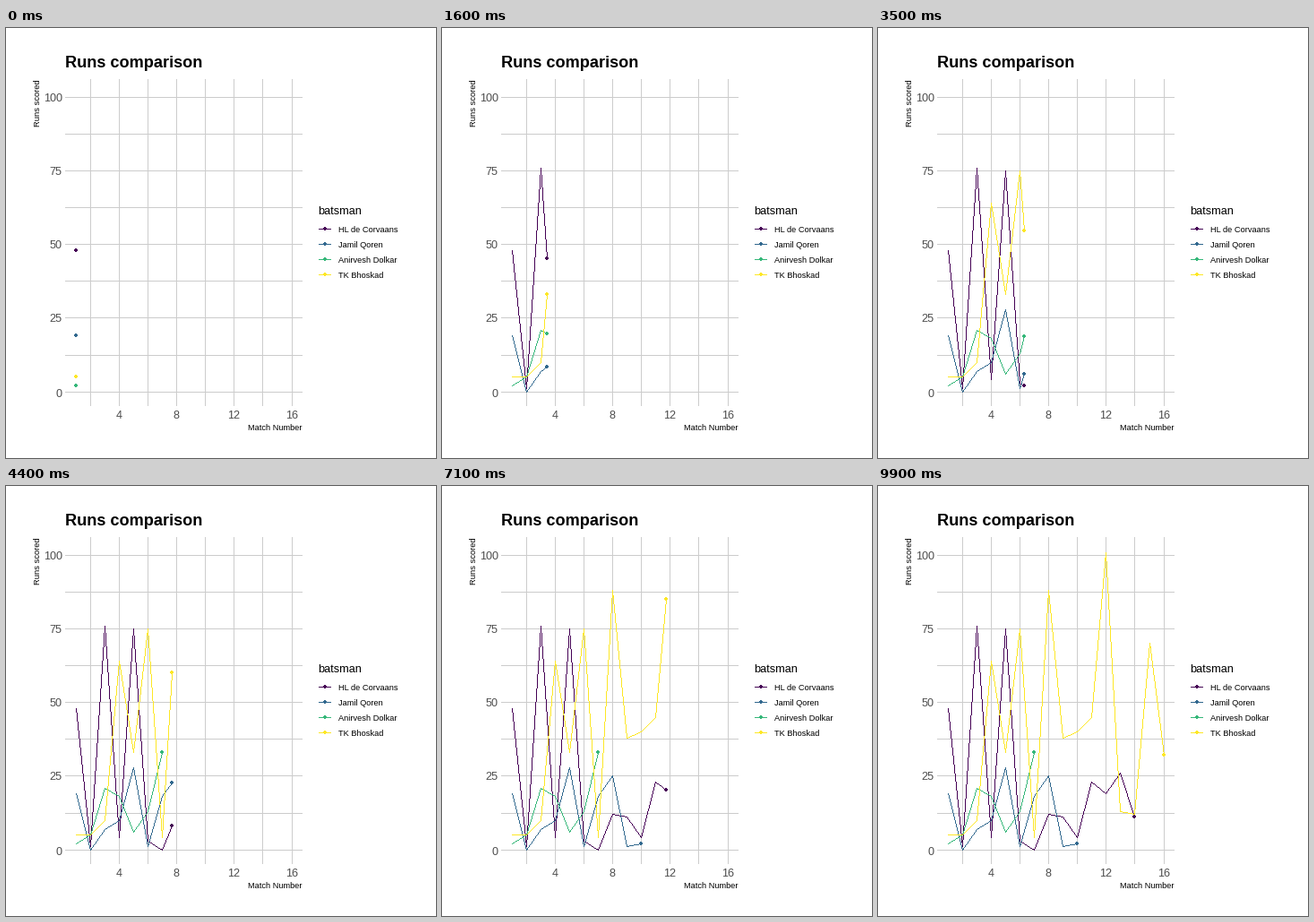
A matplotlib script for the animation above (10000 ms loop, 480 by 480 pixels).

```python
import matplotlib.pyplot as plt
import numpy as np
from matplotlib.animation import FuncAnimation
from matplotlib.colors import to_rgb

SIZE, DPI = 480, 80
FRAMES, INTERVAL = 100, 100
PX = 72 / DPI  # points per pixel

plt.rcParams["font.family"] = "Liberation Sans"

SERIES = [
    ("HL de Corvaans", "#440154",
     [48, 1, 76, 4, 75, 3, 0, 12, 11, 4, 23, 19, 26, 11]),
    ("Jamil Qoren", "#31688e", [19, 0, 7, 10, 28, 1, 18, 25, 1, 2]),
    ("Anirvesh Dolkar", "#35b779", [2, 5, 21, 18, 6, 13, 33]),
    ("TK Bhoskad", "#fde725",
     [5, 5, 10, 64, 33, 75, 4, 88, 38, 40, 45, 101, 13, 12, 70, 32]),
]
MATCHES = np.arange(1, 17)
# Each match falls on a whole frame; the reveal is linear in between.
KEYS = np.round((MATCHES - 1) * (FRAMES - 1) / 15)

LEFT, RIGHT, TOP, BOTTOM = 66, 331, 57, 422
GRID, TICK = "#cccccc", "#4d4d4d"


def px_x(match):
    return np.floor(78.2 + 16.06 * (np.asarray(match) - 1)).astype(int)


def px_y(runs):
    return np.floor(406.1 - 3.288 * np.asarray(runs)).astype(int)


# Lines and dots have hard pixel edges, so they are rasterised directly.
def stroke(img, xs, ys, color):
    for x0, y0, x1, y1 in zip(xs, ys, xs[1:], ys[1:]):
        n = max(abs(x1 - x0), abs(y1 - y0)) + 1
        cols = np.round(np.linspace(x0, x1, n)).astype(int)
        rows = np.round(np.linspace(y0, y1, n)).astype(int)
        img[rows, cols] = to_rgb(color)


def dot(img, x, y, color):
    img[y - 2:y + 2, x - 1:x + 1] = to_rgb(color)
    img[y - 1:y + 1, x - 2:x + 2] = to_rgb(color)


fig = plt.figure(figsize=(SIZE / DPI, SIZE / DPI), dpi=DPI, facecolor="white")
ax = fig.add_axes([0, 0, 1, 1])
ax.axis("off")
base = np.ones((SIZE, SIZE, 3))


def label(x, y, text, size, color="black", **kw):
    ax.text(x, y, text, fontsize=size * PX, color=color, va="baseline", **kw)


def draw_panel():
    for m in range(2, 17, 2):
        x = px_x(m)
        stroke(base, [x, x], [TOP, BOTTOM - 1], GRID)
        if m % 4 == 0:
            label(x - 0.3, 436.5, str(m), 12.6, TICK, ha="center")
    for runs in np.arange(0, 101, 12.5):
        y = px_y(runs)
        stroke(base, [LEFT, RIGHT - 1], [y, y], GRID)
        if runs % 25 == 0:
            label(62.8, y + 5.5, f"{runs:.0f}", 12.6, TICK, ha="right")
    label(LEFT, 44, "Runs comparison", 18.1, weight="bold")
    label(RIGHT, 449, "Match Number", 9.3, ha="right")
    label(38, 110, "Runs scored", 9.4, rotation=90, rotation_mode="anchor")


def draw_legend():
    label(348, 208, "batsman", 12.7)
    for i, (name, color, _) in enumerate(SERIES):
        y = int(224 + 17.28 * i)
        stroke(base, [349, 362], [y, y], color)
        dot(base, 356, y, color)
        label(371, y + 4, name, 9.25)


draw_panel()
draw_legend()
chart = ax.imshow(base, extent=(0, SIZE, SIZE, 0), interpolation="nearest",
                  aspect="auto")


def update(frame):
    img = base.copy()
    now = np.interp(frame, KEYS, MATCHES)
    heads = []
    for _, color, runs in SERIES:
        end = min(now, len(runs))
        played = MATCHES[:len(runs)]
        ms = np.append(played[played < end], end)
        xs, ys = px_x(ms), px_y(np.interp(ms, played, runs))
        stroke(img, xs, ys, color)
        heads.append((xs[-1], ys[-1], color))
    for head in heads:
        dot(img, *head)
    chart.set_data(img)
    return [chart]


anim = FuncAnimation(fig, update, frames=FRAMES, interval=INTERVAL,
                     repeat=True, repeat_delay=0)
plt.show()
```
